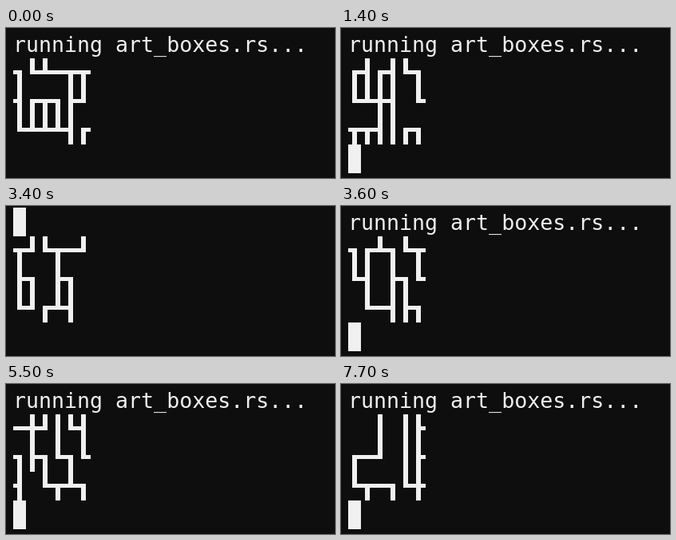
An HTML page with a canvas that plays this animation: 412 by 188 pixels, repeating every 8000 ms.

```html
<!DOCTYPE html>
<html lang="en">
<head>
<meta charset="utf-8">
<style>
  html, body { margin: 0; width: 100%; height: 100%; overflow: hidden; background: #0e0e0e; }
  canvas { display: block; }
</style>
</head>
<body>
<canvas id="stage" width="412" height="188"></canvas>
<script>
const ctx = document.getElementById('stage').getContext('2d');
const LOOP = 8000, LEFT = 9, TOP = 2, CELL_W = 16, CELL_H = 36;

// Position in this string is a bit mask of arms: 1 left, 2 right, 4 up, 8 down.
const GLYPHS = ' ╴╶─╵┘└┴╷┐┌┬│┤├┼';

// Each step: start time, three rows of boxes, cursor row (-1 hides it).
const towers = ['┬┘└┬─┘', '├┐ ├┐ ', '└┘┌┴┤ '];
const steps = [
  [0,    ['┐└┴─┬┬', '┤┌┬┐├┘', '└┴┴┴┤┌'], -1],
  [400,  ['─┬┘┌┴┬', '┐└┐│ │', '┤ └┤ ├'], 4],
  [1400, ['┌┤┌┤└┐', '└┴┼┤ └', '┬┬┤│┌┐'], 4],
  [2400, towers, 4],
  [3400, towers, 0],
  [3500, ['┐┌┴┐└┬', '└┤ ├┐└', ' └─┤├┐'], 4],
  [4500, [' ├┬┴┬┼', '┐│└┬┼┘', '┘└┐│└┬'], 4],
  [5500, ['─┼┘│└┤', '┐├┐└┐└', '┤ └┬┴┐'], 4],
  [6500, ['┬┴┼┤├┴', '┤ │└┼─', '┼┬┼┐├┬'], 4],
  [7500, ['  │ │├', '┌─┘ │├', '└┬─┐└┼'], 4],
];

function drawGlyph(glyph, x, y) {
  const arms = GLYPHS.indexOf(glyph);
  if (arms & 1) ctx.fillRect(x, y + 15, 11, 5);
  if (arms & 2) ctx.fillRect(x + 5, y + 15, 12, 5);
  if (arms & 4) ctx.fillRect(x + 5, y, 6, 20);
  if (arms & 8) ctx.fillRect(x + 5, y + 15, 6, 21);
}

function render(time) {
  const [, rows, cursor] = steps.findLast(([start]) => start <= time);
  ctx.fillStyle = '#0e0e0e';
  ctx.fillRect(0, 0, 412, 188);
  ctx.fillStyle = '#f0f0f0';
  if (cursor !== 0) {
    ctx.font = '26.6px "DejaVu Sans Mono", monospace';
    ctx.fillText('running art_boxes.rs...', LEFT, 30);
  }
  rows.forEach((row, r) => [...row].forEach((glyph, c) =>
    drawGlyph(glyph, LEFT + c * CELL_W, TOP + (r + 1) * CELL_H)));
  if (cursor >= 0) ctx.fillRect(LEFT, TOP + cursor * CELL_H, CELL_W, CELL_H);
}

function tick() {
  render(performance.now() % LOOP);
  requestAnimationFrame(tick);
}
tick();
</script>
</body>
</html>
```
